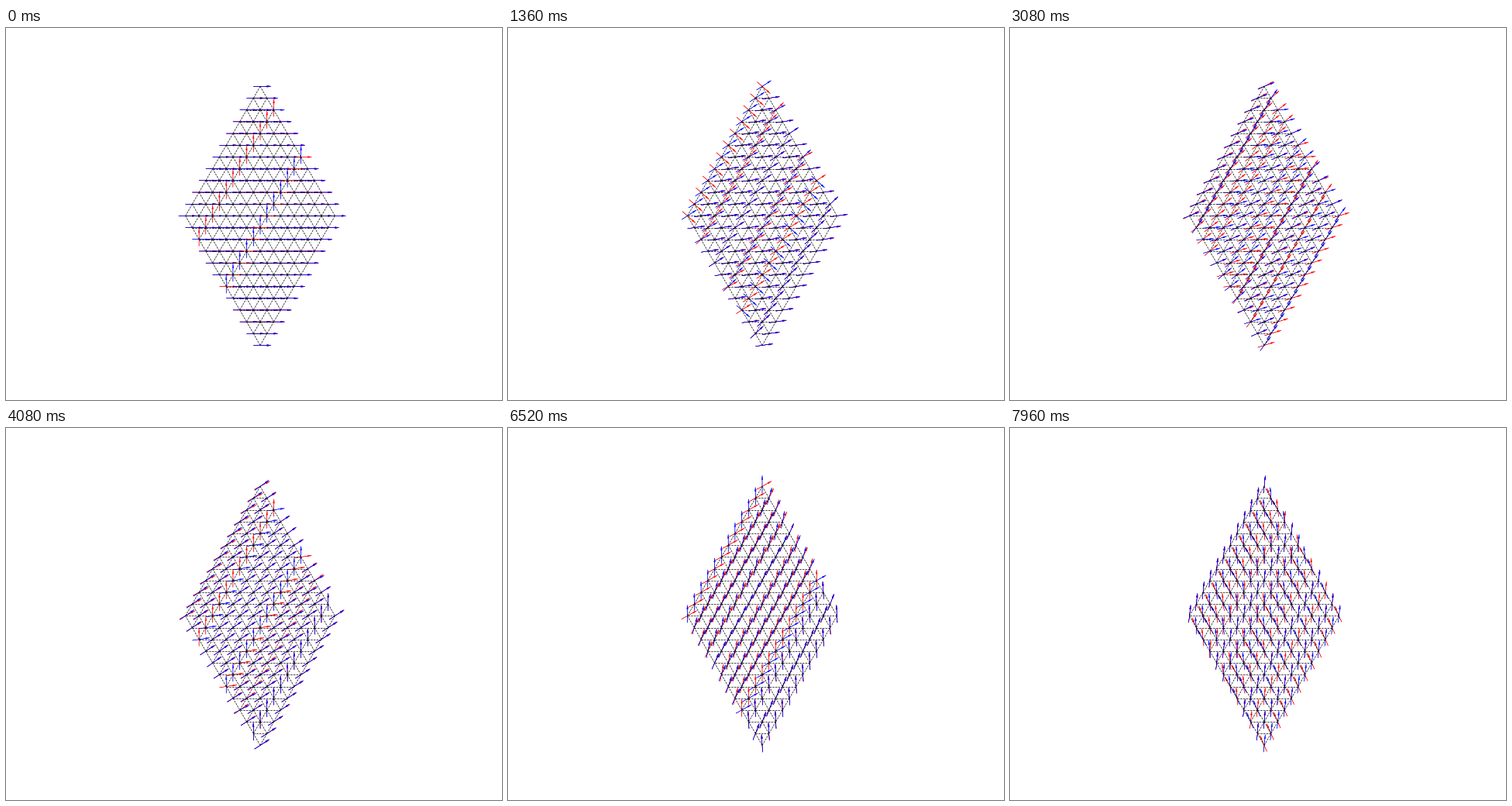
Recreate the animation shown at these times as a matplotlib script. Size 640x480 px, loop 8 s.

```python
import numpy as np
import matplotlib.pyplot as plt
from matplotlib.animation import FuncAnimation
from matplotlib.collections import LineCollection, PolyCollection

SIZE = 12
FRAMES, INTERVAL = 200, 40
SCALE = 17.54              # pixels per lattice constant
CENTRE = 328, 237.6        # lattice centre, pixels from lower left

KICK = 90                  # initial angle of the kicked columns, degrees
RED_COL, BLUE_COL = 2, 6   # columns kicked at the start
BAND = 0.369               # spin-wave bandwidth, radians per frame
GAP = 1.75 * BAND          # extra frequency of the red-blue difference

# Arrow outline for angle zero, centred on its site
OUTLINE = np.array([(-0.5, 0.0005), (0.5, 0.0005), (0.5, 0.05), (0.8, 0),
                    (0.5, -0.05), (0.5, -0.0005), (-0.5, -0.0005)])

columns = np.arange(SIZE)
waves = np.arange(SIZE)
omega = BAND * np.sin(np.pi * waves / SIZE) ** 2


def site(i, j):
    return (i - j) / 2, (SIZE - 1 - i - j) * np.sqrt(3) / 2


def lattice_bonds():
    bonds = []
    for i in range(SIZE):
        for j in range(SIZE):
            for di, dj in ((1, 0), (0, 1), (1, -1)):
                if i + di < SIZE and 0 <= j + dj < SIZE:
                    bonds.append([site(i, j), site(i + di, j + dj)])
    return bonds


def spread(start, freq, t):
    """Response of the ring of columns to a unit kick in one column."""
    phase = 2 * np.pi * np.outer(columns - start, waves) / SIZE
    return np.cos(phase) @ np.cos(freq * t) / SIZE


def spin_angles(t):
    """Red and blue angles per column: common and difference waves on a drift."""
    drift = 0.2 * t + 0.0012 * t ** 2
    common = spread(RED_COL, omega, t) + spread(BLUE_COL, omega, t)
    differ = (spread(RED_COL, omega + GAP, t)
              - spread(BLUE_COL, omega + GAP, t))
    return [np.radians(drift + KICK / 2 * (common + sign * differ))
            for sign in (1, -1)]


def arrows(angles):
    """Outlines of one arrow per site, for the given angle of each column."""
    a = np.repeat(angles, SIZE)[:, None]
    x, y = OUTLINE.T
    shape = np.stack([x * np.cos(a) - y * np.sin(a),
                      x * np.sin(a) + y * np.cos(a)], axis=-1)
    return shape + sites[:, None, :]


sites = np.array([site(i, j) for i in range(SIZE) for j in range(SIZE)])

fig = plt.figure(figsize=(6.4, 4.8), dpi=100, facecolor="white")
ax = fig.add_axes([0, 0, 1, 1])
ax.set_xlim(-CENTRE[0] / SCALE, (640 - CENTRE[0]) / SCALE)
ax.set_ylim(-CENTRE[1] / SCALE, (480 - CENTRE[1]) / SCALE)
ax.axis("off")

spins = PolyCollection([], facecolors=["red", "blue"],
                       edgecolors=["red", "blue"], linewidths=0.3,
                       joinstyle="miter", zorder=1)
ax.add_collection(spins, autolim=False)
ax.add_collection(LineCollection(lattice_bonds(), colors="black",
                                 linewidths=0.5, linestyles="--", zorder=2),
                  autolim=False)


def update(frame):
    red, blue = spin_angles(frame)
    pairs = np.stack([arrows(red), arrows(blue)], axis=1)
    spins.set_verts(list(pairs.reshape(-1, len(OUTLINE), 2)))
    return [spins]


anim = FuncAnimation(fig, update, frames=FRAMES, interval=INTERVAL,
                     repeat=True, repeat_delay=0, blit=False)
plt.show()
```
